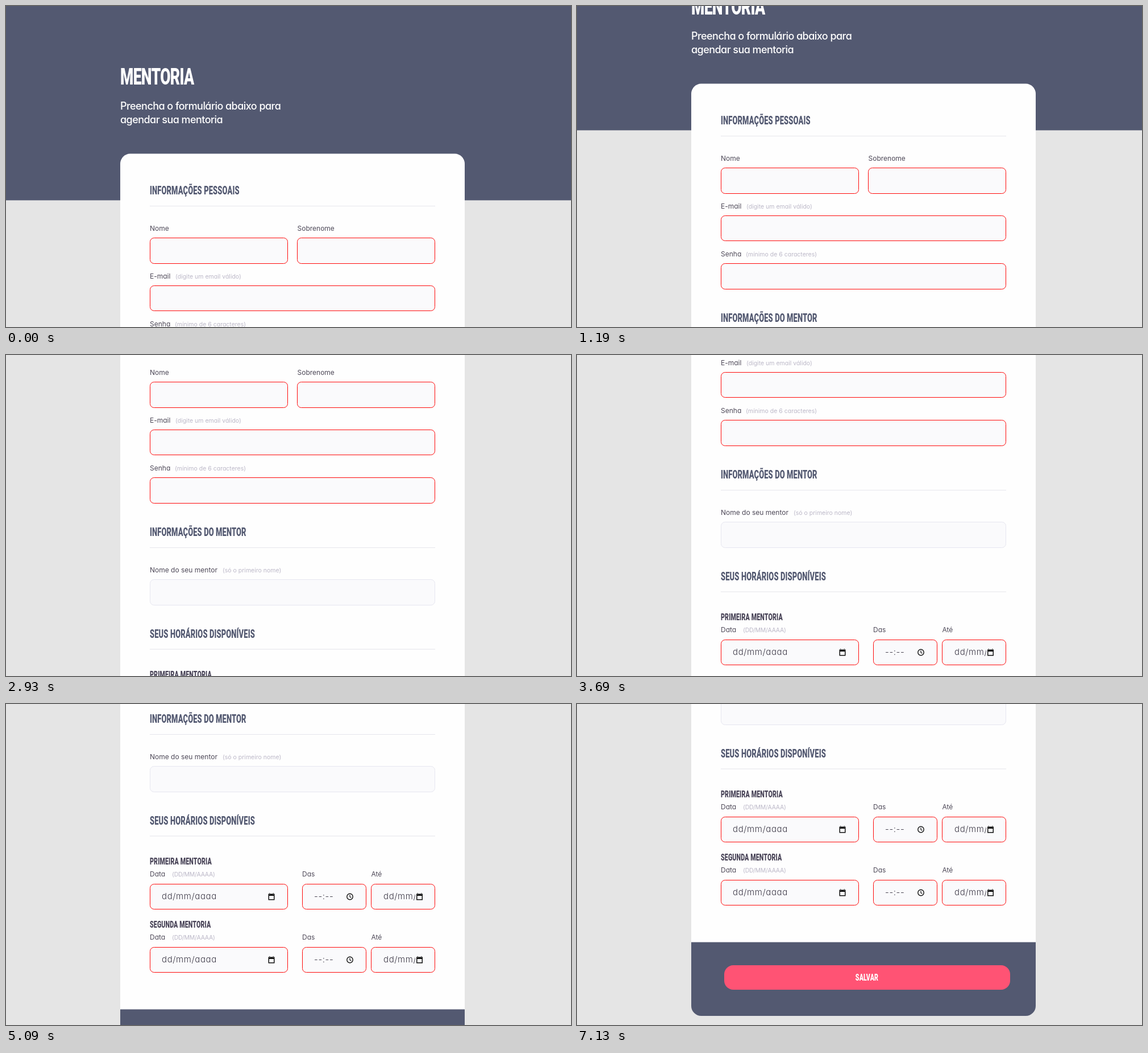
Recreate the animation shown at these times as an HTML page. Size 994 by 564 pixels, loop 8790 ms.

```html
<!DOCTYPE html>
<html lang="pt-BR">
<head>
<meta charset="utf-8">
<title>Mentoria</title>
<style>
  html, body { margin: 0; width: 100%; height: 100%; overflow: hidden; background: #e5e5e5; }
  svg { display: block; width: 994px; height: 564px; }
  text { font: 400 12px Inter, "Open Sans", sans-serif; font-feature-settings: "cv11"; fill: #4e4958; white-space: pre; }
  .intro { font-size: 18px; font-weight: 500; letter-spacing: -.55px; fill: #fff; }
  .hint { font-size: 10.5px; fill: #bcb8c8; }
  .mask { letter-spacing: -.2px; }
  .value { font-size: 15px; font-weight: 300; letter-spacing: .6px; fill: #3e3a48; }
  .display { font-family: Roboto, "Liberation Sans", sans-serif; font-weight: 800; letter-spacing: .15px; }
  .title { font-size: 41px; font-weight: 900; letter-spacing: -1.1px; fill: #fff; }
  .section { font-size: 20px; fill: #535971; }
  .slot { font-size: 16.5px; fill: #484357; }
  .save { font-size: 16.5px; fill: #fff; text-anchor: middle; }
</style>
</head>
<body>
<svg viewBox="0 0 994 564"><g id="page"></g></svg>
<script>
const page = document.getElementById('page');
const NAVY = '#535971', RED = '#ff0a0a', PALE = '#e6e6f0';

function add(tag, attrs, parent = page) {
  const el = document.createElementNS('http://www.w3.org/2000/svg', tag);
  for (const name in attrs) el.setAttribute(name, attrs[name]);
  return parent.appendChild(el);
}

function rect(x, y, width, height, fill, rx = 0) {
  return add('rect', { x, y, width, height, fill, rx });
}

function text(x, y, str, cls = '', parent = page) {
  const el = add('text', { x, y, class: cls }, parent);
  el.textContent = str;
  return el;
}

// Condensed capitals shared by all headings
function display(x, y, str, cls) {
  const el = text(0, 0, str, 'display ' + cls);
  el.setAttribute('transform', `translate(${x} ${y}) scale(.65 1)`);
}

function section(y, str) {
  display(253, y, str, 'section');
  rect(253, y + 20, 502, 1, '#e6e6ec');
}

function field(x, y, w, h, stroke = RED) {
  add('rect', { x: x + .5, y: y + .5, width: w - 1, height: h - 1, rx: 7, fill: '#fafafc', stroke });
}

function label(x, y, str, hint, hintX) {
  text(x, y, str);
  if (hint) text(hintX, y, hint, 'hint');
}

function calendar(cx, cy) {
  add('path', {
    d: `M${cx - 5.5} ${cy - 5}h11v11h-11zM${cx - 4} ${cy - 1.5}v6h8v-6z` +
       `M${cx - 4} ${cy - 6.3}h1.5v2h-1.5zM${cx + 2.5} ${cy - 6.3}h1.5v2h-1.5z`,
    fill: '#111', 'fill-rule': 'evenodd'
  });
}

function clock(cx, cy) {
  add('circle', { cx, cy, r: 5.2, fill: 'none', stroke: '#111', 'stroke-width': 1.4 });
  add('path', { d: `M${cx} ${cy - 3.2}v3.4l2.3 1.6`, fill: 'none', stroke: '#111', 'stroke-width': 1.2 });
}

function slot(y, str) {
  display(253, y, str, 'slot');
  label(253, y + 21, 'Data');
  text(292, y + 21, '(DD/MM/AAAA)', 'hint mask');
  label(521, y + 21, 'Das');
  label(642.5, y + 21, 'Até');
  const top = y + 34, base = y + 61, mid = y + 56.5;
  field(253, top, 243, 45);
  field(521, top, 113, 45);
  field(642, top, 113, 45);
  text(274, base, 'dd/mm/aaaa', 'value');
  text(542, base, '--:--', 'value');
  const crop = add('svg', { x: 664, y: top, width: 56, height: 45 });
  text(0, base - top, 'dd/mm/aaaa', 'value', crop);
  calendar(467, mid);
  clock(605, mid);
  calendar(727.5, mid);
}

function build() {
  rect(0, 0, 994, 341.4, NAVY);
  display(201, 138, 'MENTORIA', 'title');
  text(201, 181.5, 'Preencha o formulário abaixo para', 'intro');
  text(201, 206, 'agendar sua mentoria', 'intro');

  rect(201, 259.6, 606, 1000, '#fefefe', 17.5);
  add('path', { d: 'M201 1181.5h606v112a17.5 17.5 0 0 1-17.5 17.5h-571a17.5 17.5 0 0 1-17.5-17.5z', fill: NAVY });

  section(331, 'INFORMAÇÕES PESSOAIS');
  label(253, 395, 'Nome');
  label(512.5, 395, 'Sobrenome');
  field(253, 407, 243, 46);
  field(512, 407, 243, 46);
  label(253, 479, 'E-mail', '(digite um email válido)', 298);
  field(253, 491, 502, 45);
  label(253, 563, 'Senha', '(mínimo de 6 caracteres)', 297);
  field(253, 575, 502, 46);

  section(678, 'INFORMAÇÕES DO MENTOR');
  label(253, 742, 'Nome do seu mentor', '(só o primeiro nome)', 381);
  field(253, 754, 502, 46, PALE);

  section(856.5, 'SEUS HORÁRIOS DISPONÍVEIS');
  slot(927, 'PRIMEIRA MENTORIA');
  slot(1038, 'SEGUNDA MENTORIA');

  rect(259, 1222, 503, 43, '#ff5374', 16);
  display(510, 1249, 'SALVAR', 'save');
}

// Scroll offset by step, joined by a smooth Hermite curve
const LOOP = 8790, STEP = 69.48;
const KEYS = [[0, 0], [13, 83], [17, 123], [28, 214], [42, 360], [64, 559], [82, 727], [88, 763]];

function slope(i) {
  const a = KEYS[Math.max(0, i - 1)], b = KEYS[Math.min(KEYS.length - 1, i + 1)];
  return (b[1] - a[1]) / (b[0] - a[0]);
}

function scrollAt(step) {
  if (step >= 88) return 763;
  const i = KEYS.findIndex(k => k[0] > step) - 1;
  const [x0, y0] = KEYS[i], [x1, y1] = KEYS[i + 1];
  const w = x1 - x0, u = (step - x0) / w, v = 1 - u;
  return v * v * (1 + 2 * u) * y0 + u * u * (3 - 2 * u) * y1
    + w * u * v * (v * slope(i) - u * slope(i + 1));
}

const start = performance.now();

function draw() {
  const t = Math.max(0, performance.now() - start) % LOOP;
  const y = Math.round(scrollAt(Math.floor(t / STEP)));
  page.setAttribute('transform', `translate(0 ${-y})`);
  requestAnimationFrame(draw);
}

build();
draw();
</script>
</body>
</html>
```
